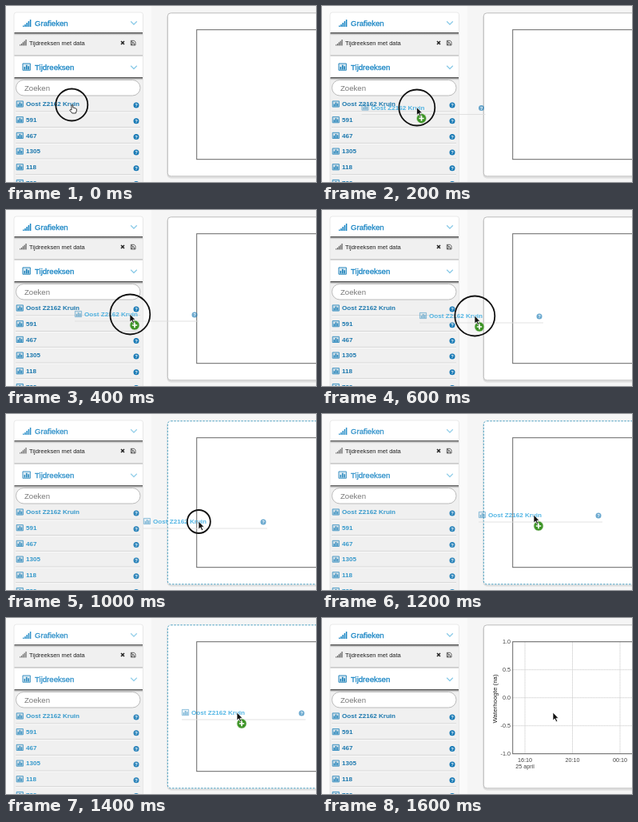
An HTML page that plays this animation: 388 by 220 pixels, repeating every 3.6 s.

```html
<!DOCTYPE html>
<html lang="nl">
<head>
<meta charset="utf-8">
<title>Tijdreeks slepen</title>
<style>
html, body { margin: 0; width: 100%; height: 100%; overflow: hidden; background: #f5f5f5; }
svg { display: block; width: 388px; height: 220px; font-family: "Liberation Sans", Arial, sans-serif; }
.head { font-size: 9.6px; fill: #1583c3; stroke: #1583c3; stroke-width: .28; }
.row { font-size: 8.1px; font-weight: bold; fill: #1c78ae; }
.axis { font-size: 7.2px; fill: #444; }
.soft .head, .soft .row, .soft use { filter: blur(.6px); opacity: .9; }
.soft .row { fill: #2390c8; }
</style>
</head>
<body>
<svg viewBox="0 0 388 220">
  <defs>
    <linearGradient id="shade" x2="0" y2="1">
      <stop offset="0" stop-color="#999"/>
      <stop offset="1" stop-color="#eee" stop-opacity="0"/>
    </linearGradient>
    <g id="divider">
      <rect x="10.5" width="160.5" height="1.6" fill="#555"/>
      <rect x="10.5" y="1.6" width="160.5" height="2.6" fill="url(#shade)"/>
    </g>
    <g id="bars">
      <path d="M.4.4H8.600V7.600H.4Z" fill="#1c80b9" fill-opacity=".18" stroke="#1c80b9" stroke-width=".8"/>
      <path d="M2.500 7V4M4.600 7V2M6.700 7V3.300" stroke="#1c80b9" stroke-width="1.400"/>
    </g>
    <path id="signal" d="M.8 9V7.5M3 9V6M5.2 9V4M7.4 9V2M9.6 9V0" stroke-width="1.5"/>
    <g id="help">
      <circle r="3.5" fill="#1779b5"/>
      <text y="2.2" text-anchor="middle" font-size="6" font-weight="bold" fill="#fff">?</text>
    </g>
    <path id="chevron" d="M-3.8-1.8L0 2L3.8-1.8" fill="none" stroke="#8ccbe8" stroke-width="1.3"/>
  </defs>

  <rect width="388" height="220" fill="#f5f5f5"/>
  <rect width="182" height="220" fill="#fafafa"/>
  <g id="side">
    <rect x="10" y="8" width="161.5" height="220" rx="3" fill="#f0f0f0" stroke="#ddd" stroke-width=".6"/>
    <path d="M10.5 34V11Q10.5 8.5 13 8.5H168.5Q171 8.5 171 11V34Z" fill="#fff"/>
    <use href="#divider" y="33"/>
    <rect x="10.5" y="62" width="160.5" height="28" fill="#fff"/>
    <path d="M10.5 62H171" stroke="#999" stroke-width=".8"/>
    <use href="#divider" y="89"/>
    <use href="#signal" x="21" y="17" stroke="#1583c3"/>
    <text class="head" x="36" y="25">Grafieken</text>
    <use href="#chevron" x="160" y="21"/>
    <use href="#signal" transform="translate(17 42) scale(.84)" stroke="#666"/>
    <text x="29" y="48.5" font-size="7.5" fill="#222">Tijdreeksen met data</text>
    <path d="M144 44L148 48M148 44L144 48" stroke="#222" stroke-width="1.5"/>
    <path d="M156.3 43.3H160.5L162 45V49H156.3ZM157.5 43.5V45.5H160M157.5 49V47H160.7V49" fill="none" stroke="#444" stroke-width=".8"/>
    <use href="#bars" transform="translate(20.5 71.5) scale(1.15)"/>
    <text class="head" x="36" y="80">Tijdreeksen</text>
    <use href="#chevron" x="160" y="76.5"/>
    <rect x="12.5" y="92.5" width="155.5" height="19.5" rx="9.7" fill="#fff" stroke="#bbb"/>
    <text x="23" y="106" font-size="9.6" fill="#777">Zoeken</text>
    <g id="rows"></g>
  </g>

  <rect x="202.5" y="10" width="200" height="204.5" rx="4" fill="none" stroke="#ddd" stroke-width="2"/>
  <rect id="panel" x="202.3" y="8.8" width="200" height="204" rx="4" fill="#fff"/>
  <rect id="blank" x="238.7" y="29.7" width="170" height="162" fill="#fff" stroke="#666"/>
  <g id="chart"></g>

  <g id="ghost" opacity=".85" style="filter:blur(.5px)">
    <use href="#bars" x="-69" y="-4" opacity=".7"/>
    <text x="-57" y="3.2" class="row" style="fill:#35a9e0">Oost Z2162 Kruin</text>
    <use href="#help" x="81" y="1" opacity=".75"/>
    <path d="M-69 9H86" stroke="#ddd"/>
  </g>
  <circle id="ring" fill="none" stroke="#111" stroke-width="1.8"/>
  <g id="badge">
    <circle cx="6" cy="14" r="6" fill="#3d9426" stroke="#c9dfc2" stroke-width=".7"/>
    <path d="M2.8 14H9.2M6 10.8V17.2" stroke="#fff" stroke-width="1.7"/>
  </g>
  <path id="arrow" d="M0 0V10L2.3 7.9L4 11.7L5.7 10.9L4 7.3H7Z" fill="#111" stroke="#fff" stroke-width=".7"/>
  <path id="hand" transform="translate(82 123)" d="M0 6V1Q.9-.5 1.8 1V4L5.5 5Q6.8 5.5 6.3 8L5.3 11H.8L-2.2 7.3Q-2 5.8 0 7Z" fill="#fff" stroke="#222" stroke-width=".9"/>
</svg>
<script>
const el = id => document.getElementById(id);
const show = (id, on) => el(id).setAttribute("display", on ? "inline" : "none");
const mix = (a, b, k) => a + (b - a) * k;
const LOOP = 3600, STEP = 200, DROP = 1600;

el("rows").innerHTML = ["Oost Z2162 Kruin", "591", "467", "1305", "118", "739"].map((name, i) => {
  const y = 122.5 + i * 19.7;
  return `<use href="#bars" x="12.8" y="${y - 4}"/>
    <text class="row" x="25" y="${y + 2.8}">${name}</text>
    <use href="#help" x="163" y="${y + 1.5}"/>
    <path d="M12 ${y + 9.5}H168" stroke="#ccc" stroke-width=".9"/>
    <path d="M12 ${y + 10.4}H168" stroke="#fff" stroke-width=".8"/>`;
}).join("");

function drawChart() {
  const grid = 'stroke="#ccc" stroke-width=".8" stroke-dasharray="1.5 .5"';
  let out = "";
  for (let i = 0; i < 5; i++) {
    const y = 29.7 + i * 35;
    out += `<path d="M239 ${y}H388" ${grid}/>
      <text class="axis" x="236" y="${y + 2.6}" text-anchor="end">${(1 - i / 2).toFixed(1)}</text>`;
  }
  ["16:10", "20:10", "00:10"].forEach((label, i) => {
    const x = 254 + i * 59.5;
    out += `<path d="M${x} 30V170" ${grid}/>
      <text class="axis" x="${x}" y="179.7" text-anchor="middle">${label}</text>`;
  });
  return out + `<text class="axis" x="254" y="188.2" text-anchor="middle">25 april</text>
    <text transform="translate(219 101) rotate(-90)" text-anchor="middle" font-size="7.9" fill="#222">Waterhoogte (na)</text>
    <rect x="238.7" y="29.7" width="170" height="140" fill="none" stroke="#666"/>`;
}
el("chart").innerHTML = drawChart();

// time, pointer x, pointer y, ring radius
const path = [
  [0, 82, 123, 20], [400, 155, 130, 25], [800, 227, 134, 25],
  [1000, 241, 134, 14.5], [1400, 289, 118, 0], [LOOP, 289, 118, 0]
];

function pose(t) {
  const i = path.findIndex((p, n) => n && t < p[0]);
  const a = path[i - 1], b = path[i], k = (t - a[0]) / (b[0] - a[0]);
  return [1, 2, 3].map(n => mix(a[n], b[n], k));
}

function draw(now) {
  const t = Math.floor((now % LOOP) / STEP) * STEP;
  const [x, y, r] = pose(t);
  const dropped = t >= DROP, dragging = t > 0 && !dropped;
  const over = t >= 1000 && !dropped;

  for (const id of ["ghost", "badge", "arrow"])
    el(id).setAttribute("transform", `translate(${x} ${y})`);
  const ring = el("ring");
  ring.setAttribute("cx", x + .3);
  ring.setAttribute("cy", y + .5);
  ring.setAttribute("r", r);

  show("ring", t <= 1000);
  show("ghost", dragging);
  show("badge", dragging && t !== 1000);
  show("hand", t === 0);
  show("arrow", t > 0);
  show("chart", dropped);
  show("blank", !dropped);

  const panel = el("panel");
  panel.setAttribute("stroke", over ? "#4a9fc0" : "#bbb");
  panel.setAttribute("stroke-dasharray", over ? "2.5 1.5" : "none");
  el("side").setAttribute("class", over ? "soft" : "");
}

const start = performance.now();
function tick() {
  draw(performance.now() - start);
  requestAnimationFrame(tick);
}
tick();
</script>
</body>
</html>
```
